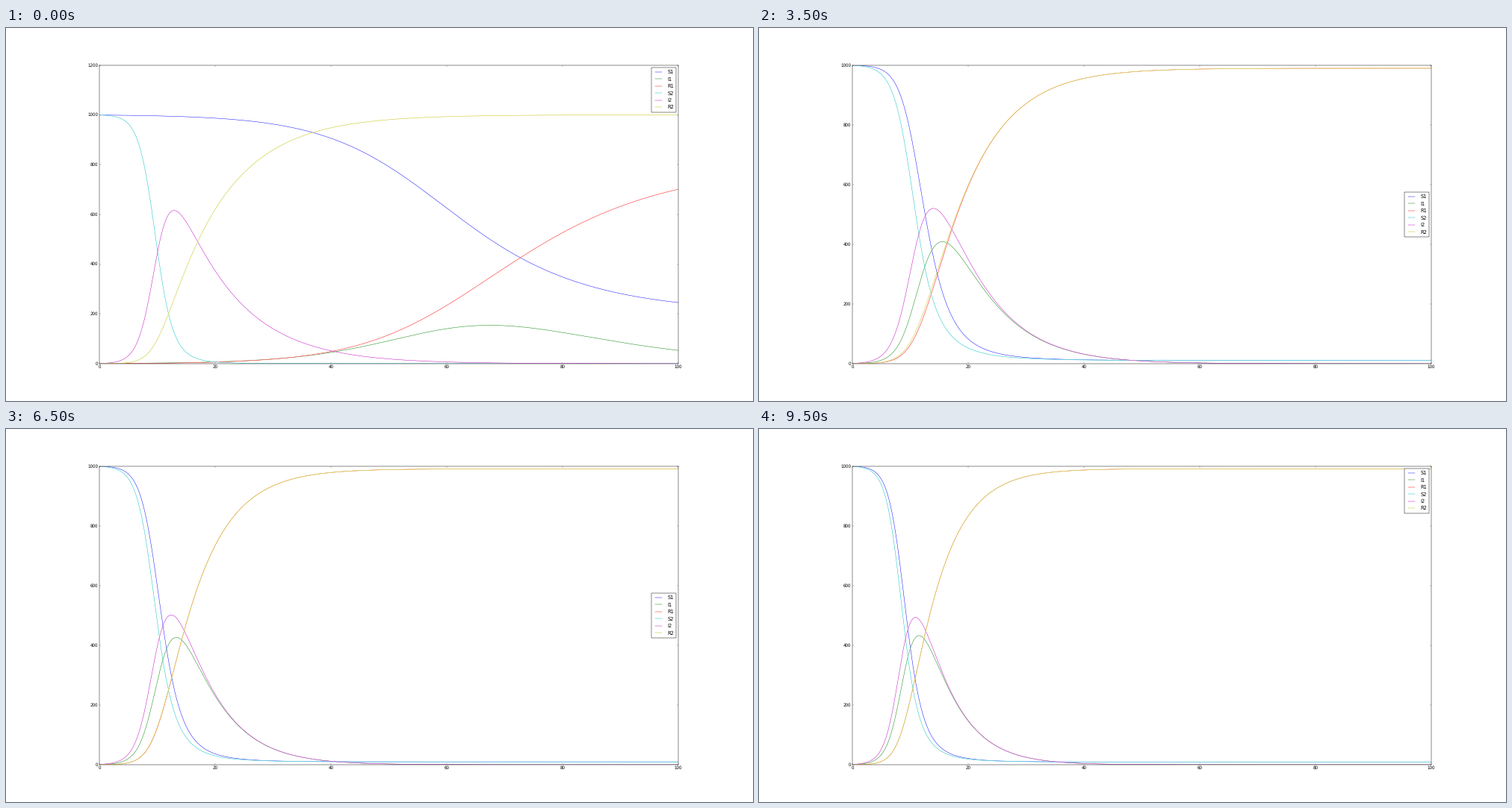
These frames come from a looping animation (1000x500 px, 10 s). A matplotlib script:

```python
import numpy as np
import matplotlib.pyplot as plt
from matplotlib.animation import FuncAnimation
from matplotlib.patheffects import withStroke

FRAMES, INTERVAL = 20, 500
SCALE = 1 / 3           # a 30 x 15 inch chart shrunk to 10 x 5
N, GAMMA = 1000, 0.1
BETA = np.array([0.2, 0.8])[:, None]
MIX = np.linspace(0, 0.9, FRAMES)
T = np.linspace(0, 100, 1001)

plt.rcParams.update({
    "font.family": "DejaVu Sans",
    "text.hinting": "none",
    "axes.linewidth": SCALE,
    "patch.linewidth": SCALE,
    "ytick.alignment": "center",
})


def slope(x):
    """Two coupled SIR groups, for every mixing rate at once."""
    s, i, _ = x
    sick = i + MIX * i[::-1]
    caught = BETA * s * sick / N
    healed = GAMMA * sick
    return np.stack([-caught, caught - healed, healed]) + MIX * (x[:, ::-1] - x)


def solve():
    x = np.zeros((3, 2, FRAMES))
    x[0], x[1] = N, 1
    h = T[1] - T[0]
    path = [x]
    for _ in T[1:]:
        a = slope(x)
        b = slope(x + h / 2 * a)
        c = slope(x + h / 2 * b)
        d = slope(x + h * c)
        x = x + h / 6 * (a + 2 * b + 2 * c + d)
        path.append(x)
    return np.array(path)


paths = solve()

fig = plt.figure(figsize=(10, 5), dpi=100, facecolor="white")
ax = fig.add_axes([0.125, 0.1, 0.775, 0.8])
ax.set_xlim(0, 100)
ax.tick_params(direction="in", top=True, right=True, length=4 * SCALE,
               width=0.5 * SCALE, pad=4 * SCALE, labelsize=12 * SCALE)

COLORS = ["blue", (0, 0.5, 0), "red",
          (0, 0.75, 0.75), (0.75, 0, 0.75), (0.75, 0.75, 0)]
LABELS = [kind + group for group in "12" for kind in "SIR"]
# A thin white edge lets a hairline hide the one below it.
cover = [withStroke(linewidth=1.3 * SCALE, foreground="white")]
lines = [ax.plot([], [], color=color, label=label, lw=SCALE,
                 path_effects=cover)[0]
         for color, label in zip(COLORS, LABELS)]
legend = ax.legend(loc="upper right", fontsize=14.4 * SCALE, numpoints=2,
                   labelspacing=0.4, fancybox=False, framealpha=1,
                   edgecolor="black")


def draw(k):
    for n, line in enumerate(lines):
        line.set_data(T, paths[:, n % 3, n // 3, k])
    top = 1200 if k == 0 else 1000
    ax.set_ylim(0, top)
    ax.set_yticks(range(0, top + 1, 200))
    legend.set_loc("upper right" if k in (0, FRAMES - 1) else "center right")
    return lines


anim = FuncAnimation(fig, draw, frames=FRAMES, interval=INTERVAL,
                     init_func=lambda: draw(0), repeat=True, repeat_delay=0)
plt.show()
```
